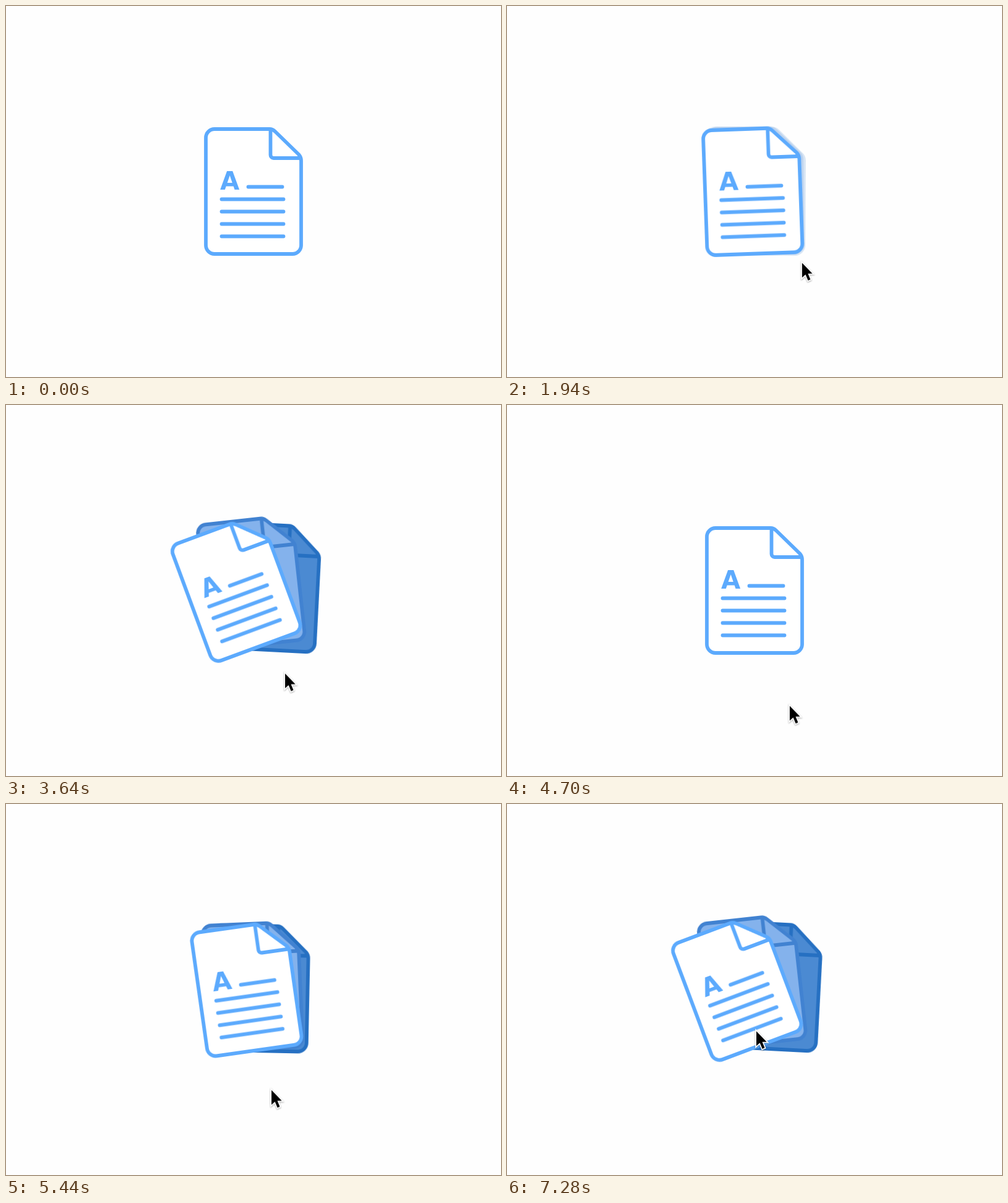
These frames come from a looping animation (800x600 px, 8 s). An HTML page:

```html
<!DOCTYPE html>
<html lang="en">
<head>
<meta charset="utf-8">
<title>Document stack</title>
<style>
  html, body {
    margin: 0;
    width: 100%;
    height: 100%;
    overflow: hidden;
    background: #fefefe;
  }
  svg { display: block; width: 100%; height: 100%; }

  .sheet {
    fill: var(--fill);
    stroke: var(--line);
    stroke-width: 5.8;
    stroke-linecap: round;
    stroke-linejoin: round;
    transform-origin: 400px 300px;
    animation: spread 8s infinite;
  }
  .back {
    --fill: #4b8ad2; --line: #2670c2;
    --open: translate(27px, -5px) rotate(3deg);
  }
  .middle {
    --fill: #84b2ec; --line: #4182d1;
    --open: translate(-3.8px, -13.3px) rotate(-6.3deg);
  }
  .front {
    --fill: #fff; --line: #5caafd;
    --open: translate(-28.2px, -3.6px) rotate(-20.6deg);
  }
  .back, .middle { animation: spread 8s infinite, fade 8s infinite; }

  .letter {
    font: bold 40.5px "DejaVu Sans", sans-serif;
    text-anchor: middle;
    fill: var(--line);
    stroke: none;
  }

  .cursor { animation: point 8s infinite; }
  .cursor .rim {
    fill: #fff;
    stroke: #fff;
    stroke-width: 3.4;
    filter: drop-shadow(0 1.2px 1.2px rgb(0 0 0 / .35));
  }

  /* Hover in and out: each transition lasts 400 ms */
  @keyframes spread {
    0%, 23.75%, 50.375%, 60.25%, 71.25%, 82.75% {
      transform: translate(0px, 0px) rotate(0deg);
      animation-timing-function: ease;
    }
    28.75%, 45.375%, 65.25%, 66.25%, 87.75%, 100% {
      transform: var(--open);
      animation-timing-function: ease;
    }
  }
  @keyframes fade {
    0%, 23.75%, 50.375%, 60.25%, 71.25%, 82.75% { opacity: 0; }
    27.25%, 47.25%, 63.75%, 68.125%, 86.25%, 100% { opacity: 1; }
  }
  @keyframes point {
    0%, 12.75% {
      transform: translate(557px, 612px);
      animation-timing-function: cubic-bezier(.3, .3, .5, 1);
    }
    17.75%, 22.5% {
      transform: translate(494px, 469px);
      animation-timing-function: cubic-bezier(.4, .1, .5, 1);
    }
    24.25% {
      transform: translate(477px, 415.5px);
      animation-timing-function: cubic-bezier(.2, .5, .4, 1);
    }
    28.5%, 39.75% {
      transform: translate(453px, 340px);
      animation-timing-function: cubic-bezier(.42, 0, .75, .8);
    }
    45.5% {
      transform: translate(451px, 433.5px);
      animation-timing-function: cubic-bezier(.25, .4, .5, 1);
    }
    50%, 58.5% {
      transform: translate(459px, 492px);
      animation-timing-function: linear;
    }
    58.75% {
      transform: translate(457px, 486.5px);
      animation-timing-function: cubic-bezier(.3, .3, .5, 1);
    }
    62.75% {
      transform: translate(437px, 372px);
      animation-timing-function: cubic-bezier(.4, 0, .7, .85);
    }
    68% {
      transform: translate(429px, 462px);
      animation-timing-function: cubic-bezier(.2, .4, .5, 1);
    }
    71.75%, 78.25% {
      transform: translate(431px, 481px);
      animation-timing-function: cubic-bezier(.36, 0, .64, 1);
    }
    88.5%, 100% { transform: translate(403px, 367px); }
  }
</style>
</head>
<body>
<svg viewBox="0 0 800 600">
  <defs>
    <g id="page">
      <path d="M337 199H426Q431 199 435 203L473 240Q477 244.500 477 250V387a14 14 0 0 1-14 14H337a14 14 0 0 1-14-14V213a14 14 0 0 1 14-14Z"/>
      <path fill="none" d="M427.500 201V241a5 5 0 0 0 5 5H475"/>
    </g>
    <path id="arrow" d="M0 .5V24.300L5.600 19.200 9.700 28.900 13.500 27.300 9.500 17.800H16.700Z"/>
  </defs>

  <g class="sheet back"><use href="#page"/></g>
  <g class="sheet middle"><use href="#page"/></g>
  <g class="sheet front">
    <use href="#page"/>
    <path d="M391.500 292.500H446.500M348.500 312.500H448.500M348.500 332.500H448.500M348.500 352.500H448.500M348.500 372.500H448.500"/>
    <text class="letter" x="361.700" y="296.500">A</text>
  </g>

  <g class="cursor">
    <use class="rim" href="#arrow"/>
    <use href="#arrow"/>
  </g>
</svg>
</body>
</html>
```
